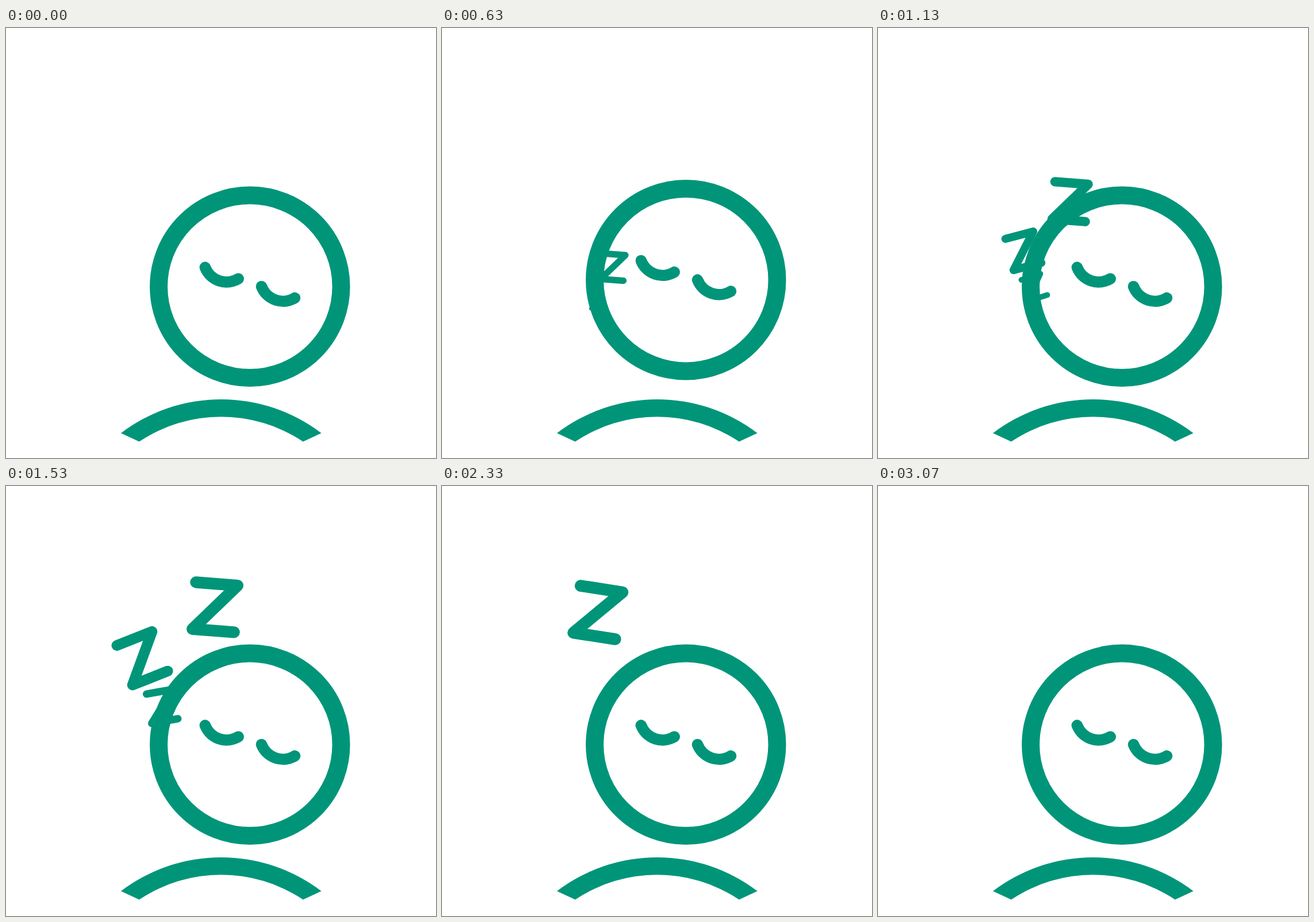
An HTML page for the animation above (3960 ms loop, 748 by 748 pixels).

```html
<!DOCTYPE html>
<html lang="en">
<head>
<meta charset="utf-8">
<title>Sleeping figure</title>
<style>
  html, body { margin: 0; height: 100%; overflow: hidden; background: #fff; }
  svg { display: block; width: 100%; height: 100%; }
</style>
</head>
<body>
<svg viewBox="0 0 748 748" fill="none" stroke="#009579" stroke-linecap="round" stroke-linejoin="round">
  <path fill="#009579" stroke="none" d="M200 704.7A288 288 0 0 1 548.5 704.7L516.8 719.5A257 257 0 0 0 231.7 719.5Z"/>
  <g id="head">
    <circle cx="424.3" cy="449.8" r="158.7" stroke-width="31"/>
    <g stroke-width="19.5">
      <path d="M346.3 416.3A40 40 0 0 0 404.2 436.2"/>
      <path d="M444.5 449.7A40 40 0 0 0 502.4 469.6"/>
    </g>
  </g>
  <g id="letters" stroke-width=".25"></g>
</svg>
<script>
const LOOP = 3960, BOB = 1130;
const head = document.getElementById('head');
const letters = document.getElementById('letters');

// Each letter rises from behind the ring: ease start and length, hide time,
// start point, travel, start size, start angle and turn (degrees).
const specs = [
  { from: -74, dur: 2348, hide: 2115, x: 271.4, y: 497, dx: 120.8, dy: -375, size: 30, angle: 4.4, turn: 0 },
  { from: 272, dur: 2240, hide: 2315, x: 272.6, y: 497, dx: -60, dy: -333, size: 34, angle: -6, turn: -26.3 },
  { from: 612, dur: 2540, hide: 3060, x: 272, y: 490, dx: -1, dy: -358, size: 31.7, angle: -22.5, turn: 41.5 }
];

for (const s of specs) {
  s.el = document.createElementNS('http://www.w3.org/2000/svg', 'path');
  s.el.setAttribute('d', 'M-.445-.5H.445L-.445.5H.445');
  letters.append(s.el);
}

const clamp = v => Math.min(1, Math.max(0, v));
const ease = u => u * u * (3 - 2 * u);

function draw(t) {
  const lift = t < BOB ? 12 * Math.sin(Math.PI * t / BOB) ** 2 : 0;
  head.setAttribute('transform', `translate(0 ${-lift})`);
  for (const s of specs) {
    const p = ease(clamp((t - s.from) / s.dur));
    // Stay small until clear of the ring.
    const size = (s.size + 67.5 * p) * clamp(p / 0.105);
    const shown = p > 0 && t >= 30 && t < s.hide;
    s.el.setAttribute('visibility', shown ? 'visible' : 'hidden');
    s.el.setAttribute('transform',
      `translate(${s.x + s.dx * p} ${s.y + s.dy * p}) rotate(${s.angle + s.turn * p}) scale(${size})`);
  }
}

const start = performance.now();
function tick() {
  draw((performance.now() - start) % LOOP);
  requestAnimationFrame(tick);
}
tick();
</script>
</body>
</html>
```
